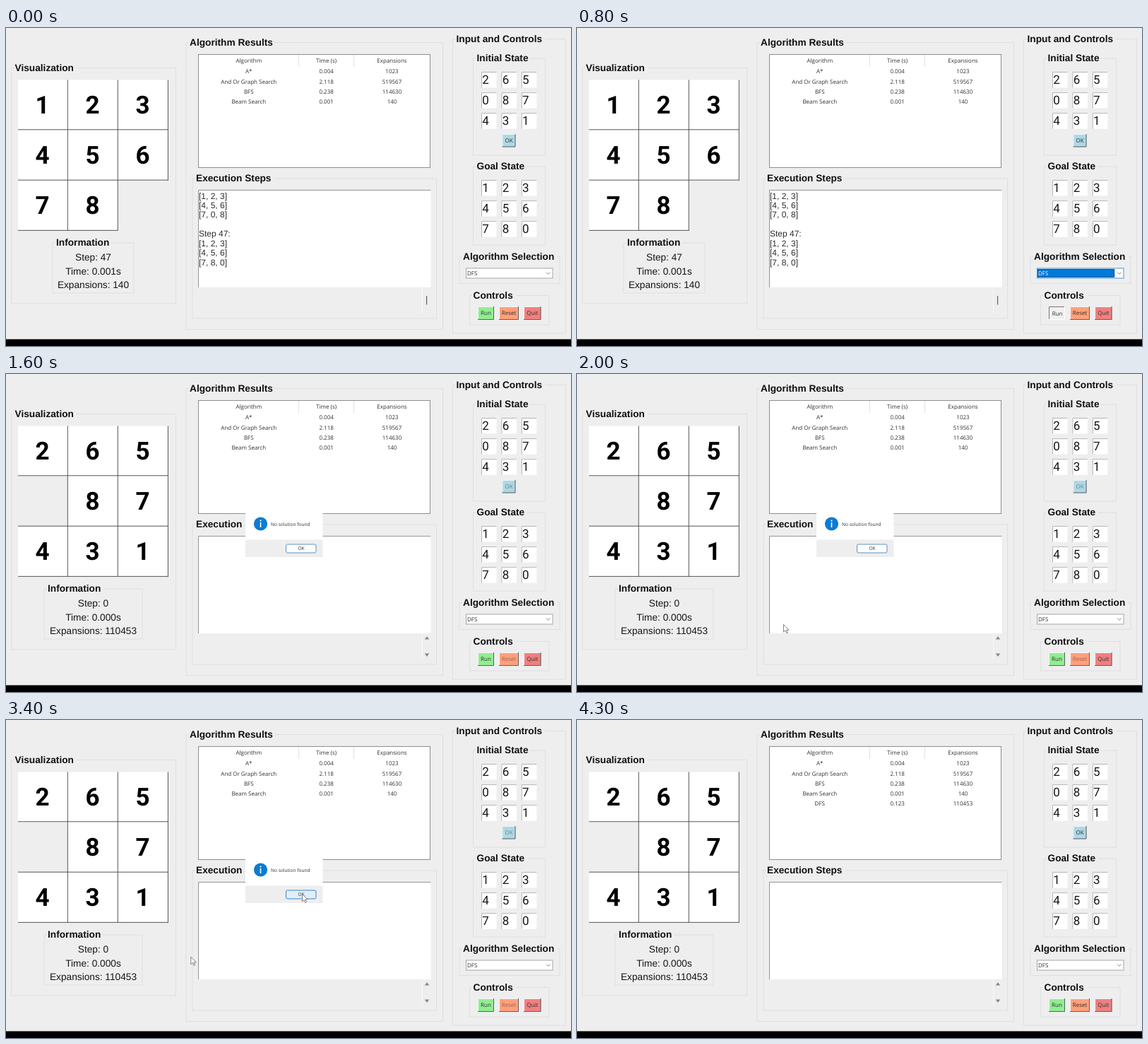
Recreate the animation shown at these times as an HTML page. Size 800 by 450 pixels, loop 4.4 s.

```html
<!DOCTYPE html>
<html lang="en">
<head>
<meta charset="utf-8">
<title>8-puzzle solver</title>
<style>
  html, body { margin: 0; width: 100%; height: 100%; overflow: hidden; background: #eeeeef; }
  svg { display: block; width: 800px; height: 450px; }
  text {
    white-space: pre; text-rendering: geometricPrecision;
    font-family: "Liberation Sans", Arial, sans-serif; font-size: 13.7px; fill: #161616;
  }
  .title { font-weight: bold; fill: #101010; }
  .tile, .entry { font-family: Roboto, "Liberation Sans", sans-serif; }
  .tile { font-weight: bold; font-size: 35px; fill: #000; }
  .entry { font-size: 17px; }
  .log { font-size: 12px; fill: #2a2a2a; }
  .ui { font-family: "Open Sans", "Noto Sans", sans-serif; font-size: 8px; fill: #303030; }
  .small { font-size: 6.6px; }
  .mid { text-anchor: middle; }
</style>
</head>
<body>
<svg id="stage" viewBox="0 0 800 450"></svg>
<script>
const LOOP = 4400, STEP = 100;
const stage = document.getElementById("stage");
const timed = [];
let parent = stage;

function add(tag, attrs, content) {
  const el = document.createElementNS("http://www.w3.org/2000/svg", tag);
  for (const key in attrs) el.setAttribute(key, attrs[key]);
  if (content !== undefined) el.textContent = content;
  return parent.appendChild(el);
}
const box = (x, y, x2, y2, fill, more) =>
  add("rect", { x, y, width: x2 - x, height: y2 - y, fill, ...more });
const path = (d, stroke, width = 1, fill = "none") =>
  add("path", { d, stroke, "stroke-width": width, fill });
const text = (x, y, value, cls = "", more) => add("text", { x, y, class: cls, ...more }, value);

// Everything drawn inside is visible from `from` until `to`.
function during(from, to, draw) {
  const outer = parent;
  parent = add("g", {});
  timed.push({ el: parent, from, to });
  draw();
  parent = outer;
}

function frame(x, y, x2, y2, title, width) {
  box(x, y, x2, y2, "none", { stroke: "#dfdfe0" });
  box(x + 4, y - 2, x + 6 + width, y + 3, "#eeeeef");
  text(x + 5, y + 4.1, title, "title");
}

function button(x, y, x2, y2, color, label, { off = false, sunken = false } = {}) {
  box(x, y, x2, y2, color);
  const [light, dark] = sunken ? ["#777", "#fff"] : ["#f4f4f4", "#606060"];
  path(`M${x + .5} ${y2}V${y + .5}H${x2}`, light);
  path(`M${x} ${y2 - .5}H${x2 - .5}V${y}`, dark);
  const shift = sunken ? .6 : 0;
  text((x + x2) / 2 + shift, y + 12 + shift, label, "ui mid", off ? { style: "fill:#303030;opacity:.5" } : {});
}

function entries(values, top) {
  [...values].forEach((digit, i) => {
    const x = 673 + i % 3 * 28.4, y = top + Math.floor(i / 3) * 29.1;
    box(x, y, x + 21.5, y + 22.5, "#fff");
    path(`M${x + .5} ${y + 22.5}V${y + .5}H${x + 21.5}`, "#b5b5b5");
    text(x + 1.3, y + 17, digit, "entry");
  });
}

function board(values) {
  const size = 71;
  [...values].forEach((digit, i) => {
    const x = 17 + i % 3 * size, y = 73.5 + Math.floor(i / 3) * size;
    if (digit === "0") return;
    box(x, y, x + size, y + size, "#fff");
    text(x + 34.5, y + 47.2, digit, "tile mid");
  });
  // The blank corner leaves the outer border open.
  const open = values[8] === "0";
  const right = open ? 215.5 : 287, bottom = open ? 158.5 : 230;
  path(`M87.3 73.5V287M158.3 73.5V287M17 143.8H230M17 215.2H230M229.4 73.5V${right}M17 286.4H${bottom}`, "#555");
}

function information(halfWidth, lines) {
  frame(123.5 - halfWidth, 304, 123.5 + halfWidth, 375, "Information", 77);
  lines.forEach((line, i) => text(123.5, 328.6 + i * 19.9, line, "mid"));
}

function tableRow(y, cells) {
  cells.forEach((cell, i) => text([343.8, 453.6, 546.5][i], y, cell, "ui mid"));
}

function combo(focused) {
  box(651.5, 340, 774, 354, "#fff", { stroke: focused ? "#4a94d4" : "#a6a6a6" });
  if (focused) {
    box(652.5, 341.5, 760.5, 352.5, "#0078d7", { stroke: "#123f66", "stroke-width": .8 });
    path("M761.5 340V354", "#b9d6ee");
  }
  text(653, 350, "DFS", "ui", focused ? { style: "fill:#fff" } : {});
  path("M765 345.6L767.8 348.4L770.6 345.6", "#777", .9);
}

function dialog(hover) {
  box(339, 196.5, 448.5, 259, "#fff");
  box(339, 234.5, 448.5, 259, "#eeeeef");
  add("circle", { cx: 360.5, cy: 212, r: 9.6, fill: "#0c7bd1" });
  add("circle", { cx: 360.5, cy: 207.6, r: 1.1, fill: "#fff" });
  path("M360.5 210V217", "#fff", 1.6);
  text(375, 214.7, "No solution found", "ui small");
  box(396.5, 241, 439, 253, hover ? "#e0eef9" : "#fdfdfd", { rx: 2, stroke: hover ? "#3a86c8" : "#5b94c6" });
  text(418, 249.4, "OK", "ui small mid");
}

function pointer(x, y) {
  const el = path("M0 0V10.6L2.5 8.3L4.3 12.3L6 11.5L4.2 7.7H7.5Z", "#666", .8, "#fff");
  el.setAttribute("transform", `translate(${x} ${y})`);
  return el;
}

const CLICK = 500, SOLVED = 1300, ALERT = 1500, CLOSED = 3900;

box(0, 0, 800, 450, "#eeeeef");
box(0, 440.4, 800, 450, "#000");

frame(7.5, 56.5, 240.5, 390, "Visualization", 86);
during(0, SOLVED, () => {
  board("123456780");
  information(57.5, ["Step: 47", "Time: 0.001s", "Expansions: 140"]);
});
during(SOLVED, LOOP, () => {
  board("265087431");
  information(69.5, ["Step: 0", "Time: 0.000s", "Expansions: 110453"]);
});

frame(255, 20.5, 618.5, 426.5, "Algorithm Results", 119);
box(272.5, 37.5, 600.5, 197.5, "#fff", { stroke: "#8c8f94" });
path("M414.5 38V55M492.5 38V55", "#e2e2e2");
[
  ["Algorithm", "Time (s)", "Expansions"],
  ["A*", "0.004", "1023"],
  ["And Or Graph Search", "2.118", "519567"],
  ["BFS", "0.238", "114630"],
  ["Beam Search", "0.001", "140"]
].forEach((cells, i) => tableRow(i ? 50.2 + i * 14.2 : 48.8, cells));
during(CLOSED, LOOP, () => tableRow(121.3, ["DFS", "0.123", "110453"]));

frame(264, 213, 609.5, 411, "Execution Steps", 110);
box(272, 229, 601.5, 367, "#fff");
path("M272.5 367V229.5H601.5", "#959595");
path("M589.5 368V404", "#f8f8f8");
during(0, SOLVED, () => {
  ["[1, 2, 3]", "[4, 5, 6]", "[7, 0, 8]", "", "Step 47:", "[1, 2, 3]", "[4, 5, 6]", "[7, 8, 0]"]
    .forEach((line, i) => text(273, 241.5 + i * 13.45, line, "log"));
  path("M595.6 379V391.5", "#555", 1.1);
});
during(SOLVED, LOOP, () => {
  path("M592.8 375.5L596 371.2L599.2 375.5Z", "none", 0, "#858585");
  path("M592.8 395.6L596 399.9L599.2 395.6Z", "none", 0, "#858585");
});

frame(632.5, 15.5, 792.5, 432, "Input and Controls", 125);
frame(661.5, 43, 763.5, 180, "Initial State", 74);
entries("265087431", 62);
frame(661.5, 196, 763.5, 307, "Goal State", 70);
entries("123456780", 215);

frame(642, 323.5, 784, 361.5, "Algorithm Selection", 132);
during(0, 300, () => combo(false));
during(300, SOLVED, () => combo(true));
during(SOLVED, LOOP, () => combo(false));

frame(656.5, 378.5, 769, 420, "Controls", 60);
const runButton = (color, sunken) => button(668, 394, 691, 413, color, "Run", { sunken });
during(0, CLICK, () => runButton("#90ee90"));
during(CLICK, SOLVED, () => runButton("#f0f0f0", true));
during(SOLVED, LOOP, () => runButton("#90ee90"));
for (const [from, to, off] of [[0, SOLVED, false], [SOLVED, CLOSED, true], [CLOSED, LOOP, false]]) {
  during(from, to, () => {
    button(702.5, 150, 721.5, 168.5, "#add8e6", "OK", { off });
    button(698, 394, 726, 413, "#ffa07a", "Reset", { off });
  });
}
button(733, 394, 757.5, 413, "#f08080", "Quit");

let mouse;
during(ALERT, 3200, () => dialog(false));
during(3200, CLOSED, () => { dialog(true); pointer(419.5, 246.3); });
during(2500, 3200, () => box(424.5, 257.5, 426, 259, "#555"));
during(1800, CLOSED, () => { mouse = pointer(0, 0); });

// time, x, y
const track = [[1800, 292.5, 354.5], [2000, 292.5, 354.5], [2600, 268.5, 348.5], [3100, 261.8, 335.2], [LOOP, 261.8, 335.2]];

function locate(t) {
  const next = Math.max(1, track.findIndex(point => point[0] > t));
  const [t0, x0, y0] = track[next - 1], [t1, x1, y1] = track[next];
  const k = Math.max(0, (t - t0) / (t1 - t0));
  return [x0 + (x1 - x0) * k, y0 + (y1 - y0) * k];
}

function render() {
  const t = Math.floor(performance.now() % LOOP / STEP) * STEP;
  for (const { el, from, to } of timed) el.style.display = t >= from && t < to ? "" : "none";
  mouse.setAttribute("transform", `translate(${locate(t).join(" ")})`);
  requestAnimationFrame(render);
}
render();
</script>
</body>
</html>
```
